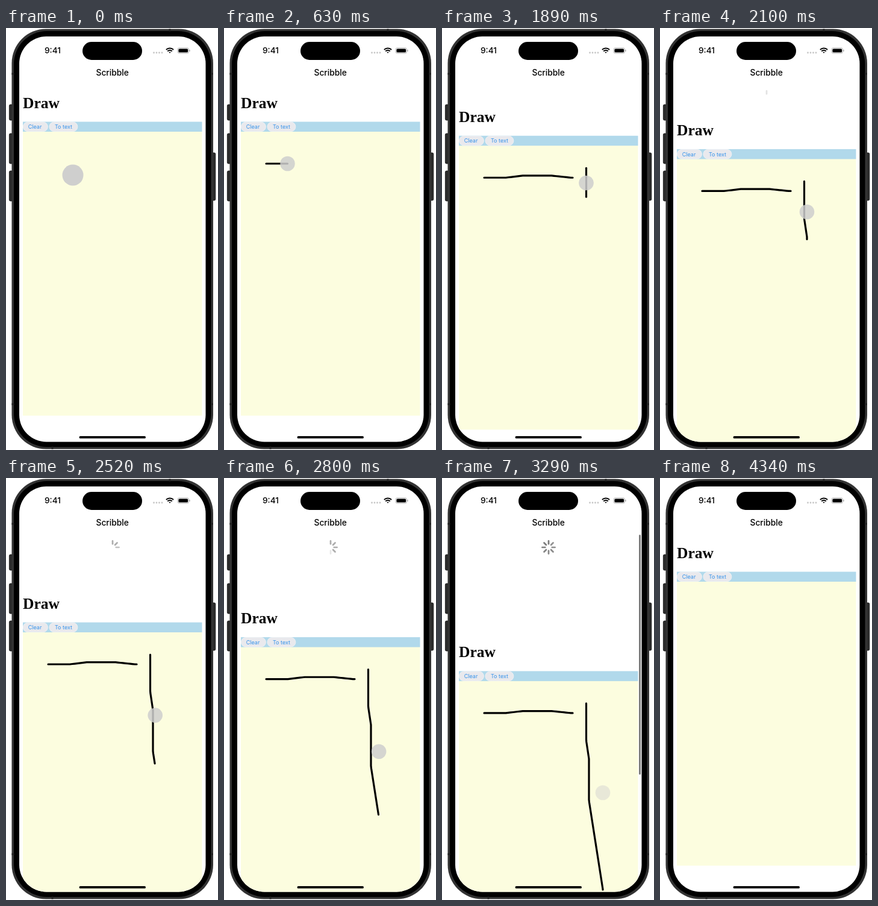
Animation, 352 px wide and 700 px high, one loop 4480 ms. Source, as an HTML page:

```html
<!DOCTYPE html>
<html lang="en">
<head>
<meta charset="utf-8">
<title>Scribble</title>
<style>
html, body { margin: 0; width: 100%; height: 100%; overflow: hidden; background: #fff; }
svg { display: block; width: 352px; height: 700px; }
text { font-family: Inter, Roboto, sans-serif; }
.ink { fill: none; stroke: #000; stroke-width: 3.2; stroke-linecap: round; stroke-linejoin: round; }
.bar { font-weight: 500; text-anchor: middle; }
.btn rect { fill: #e9e9ed; stroke: #f4f4f6; stroke-width: .8; }
.btn text { font-size: 9px; fill: #3592ea; text-anchor: middle; }
</style>
</head>
<body>
<svg viewBox="0 0 352 700">
  <clipPath id="screen"><rect x="22" y="14" width="309.5" height="672.5" rx="45"/></clipPath>

  <!-- phone body -->
  <g fill="#2b2b2b" stroke="#111" stroke-width=".8">
    <rect x="5.4" y="127" width="8" height="26" rx="2"/>
    <rect x="5.4" y="175" width="8" height="50" rx="2"/>
    <rect x="5.4" y="237" width="8" height="50" rx="2"/>
    <rect x="340" y="207" width="7.8" height="79" rx="2"/>
  </g>
  <rect x="9.5" y="1.5" width="334.5" height="697" rx="57" fill="#333"/>
  <rect x="13" y="5" width="327.5" height="690" rx="55"/>
  <path d="M272 1.5v4M77 694.5v4M9.5 76h4M340 76h4M9.5 624h4M340 624h4" stroke="#222" stroke-width="3"/>

  <g clip-path="url(#screen)">
    <rect x="22" y="14" width="310" height="673" fill="#fff"/>
    <g id="page">
      <text x="28" y="132.5" style="font:bold 25.5px 'Liberation Serif',serif">Draw</text>
      <rect x="28" y="171" width="297.5" height="472" fill="#fcfddf"/>
      <rect x="28" y="155.5" width="297.5" height="16.5" fill="#b1d9eb"/>
      <g class="btn">
        <rect x="28.4" y="156" width="41" height="15.6" rx="7.8"/>
        <text x="48" y="167.2">Clear</text>
        <rect x="71.9" y="156" width="47" height="15.6" rx="7.8"/>
        <text x="95.5" y="167.2">To text</text>
      </g>
      <polyline id="across" class="ink"/>
      <polyline id="down" class="ink"/>
    </g>
    <g id="spinner" transform="translate(177 115)" stroke="#777" stroke-width="2.7" stroke-linecap="round"></g>
    <rect id="scroll" x="327" width="3" rx="1.5" fill="#7d7d7d"/>
    <circle id="touch" fill="#cecece"/>
    <rect x="121.5" y="677" width="110.5" height="3.8" rx="1.9"/>
  </g>

  <!-- status and title bars -->
  <rect x="127" y="23" width="99" height="30" rx="15"/>
  <text class="bar" x="77.5" y="42.3" font-size="13.7">9:41</text>
  <text class="bar" x="176.7" y="79" font-size="13.8">Scribble</text>
  <path d="M245.5 41h14" stroke="#c6c6c6" stroke-width="2.8" stroke-linecap="round" stroke-dasharray="0 4.5"/>
  <g fill="none" stroke="#000" stroke-width="1.9">
    <path d="M265.9 36a8.8 8.8 0 0 1 12.2 0M268.2 38.5a5.4 5.4 0 0 1 7.6 0"/>
    <path d="M270.3 39.8h3.4l-1.7 2.2z" fill="#000" stroke="none"/>
  </g>
  <rect x="285" y="33" width="18.5" height="9" rx="2.8" fill="none" stroke="#aaa" stroke-width=".9"/>
  <rect x="286.4" y="34.4" width="15.7" height="6.2" rx="1.7"/>
  <path d="M305 36v3" stroke="#aaa" stroke-width="1.2"/>
</svg>
<script>
const LOOP = 4480, STEP = 70;
const LIFT = 1260, PRESS = 1680, RELEASE = 3290, RELOAD = 3360;
const LEFT = 70, TOP = 209;

const $ = id => document.getElementById(id);
const set = (el, attrs) => { for (const k in attrs) el.setAttribute(k, attrs[k]); };
const clamp = v => Math.min(1, Math.max(0, v));
const ramp = (v, from, to) => clamp((v - from) / (to - from));

// Shapes of the two pen strokes
const acrossY = x => 225 - 3.3 * Math.min(ramp(x, 106, 134), ramp(x, 214, 182));
const downX = y => 239.5 + 4.5 * ramp(y, 271, 301) + 23 * ramp(y, 370, 517);

// Finger position along each stroke
const acrossEnd = t => {
  const u = ramp(t, 490, LIFT);
  return LEFT + 147 * u * (1.4 - .4 * u);
};
const downEnd = t =>
  TOP + 96 * ramp(t, PRESS, 2100) + 217 * (1 - (1 - ramp(t, 2170, RELEASE)) ** 1.4);

// Rubber-band pull, plus the room the spinner takes
const pullAt = t => {
  const drag = downEnd(t) - TOP;
  return drag / (2.02 + .00096 * drag) + 30 * ramp(t, 3080, RELEASE);
};

function touchAt(t) {
  if (t < 490) {
    const u = t / 490;
    return { cx: 111 - 41 * u, cy: 244 - 19 * u, r: 17.5 - 5 * u, opacity: .96 - .11 * u };
  }
  if (t < PRESS) {
    const gone = ramp(t, LIFT, 1470);
    return { cx: acrossEnd(t), cy: 225, r: 12.3 + 5 * gone, opacity: .85 * (1 - gone) };
  }
  const y = downEnd(t);
  return {
    cx: downX(y), cy: y, r: 12.3 + 5 * ramp(t, RELEASE, 3430),
    opacity: t < 3430 ? .85 * (1 - ramp(t, 2800, 3850)) : 0
  };
}

function trace(from, to, point) {
  const out = [];
  for (let v = from; v < to; v += 4) out.push(point(v));
  return [...out, point(to)].join(" ");
}

const spokes = Array.from({ length: 8 }, (_, i) => {
  const line = document.createElementNS("http://www.w3.org/2000/svg", "line");
  set(line, { y1: -5.7, y2: -10.6, transform: `rotate(${i * 45})` });
  return $("spinner").appendChild(line);
});

function draw(now) {
  let t = Math.floor(now % LOOP / STEP) * STEP;
  if (t > 2100 && t < 2310) t = 2100; // the screen stalls briefly
  const inked = t < RELOAD;
  const pull = inked ? pullAt(t) : 0;

  set($("page"), { transform: `translate(0 ${pull})` });
  set($("touch"), touchAt(t));
  set($("across"), { points: inked && t >= 560 ? trace(LEFT, acrossEnd(t), x => [x, acrossY(x)]) : "" });
  const tip = downEnd(t) - 4 * ramp(t, 2100, 2500);
  set($("down"), { points: inked && t >= PRESS ? trace(TOP, tip, y => [downX(y), y]) : "" });

  const loading = t >= 2940 && inked;
  spokes.forEach((s, i) => set(s, {
    opacity: loading ? .8 + .2 * ((i + t / STEP) % 8) / 8 : .6 * clamp((pull - 40) / 16 - i)
  }));

  const ending = t === RELOAD;
  set($("scroll"), {
    y: ending ? 130 : 94,
    height: ending ? 516 : 563 - pull,
    opacity: ending ? .4 : t >= 3150 && inked ? 1 : 0
  });
}

const start = performance.now();
function tick() {
  draw(performance.now() - start);
  requestAnimationFrame(tick);
}
tick();
</script>
</body>
</html>
```
